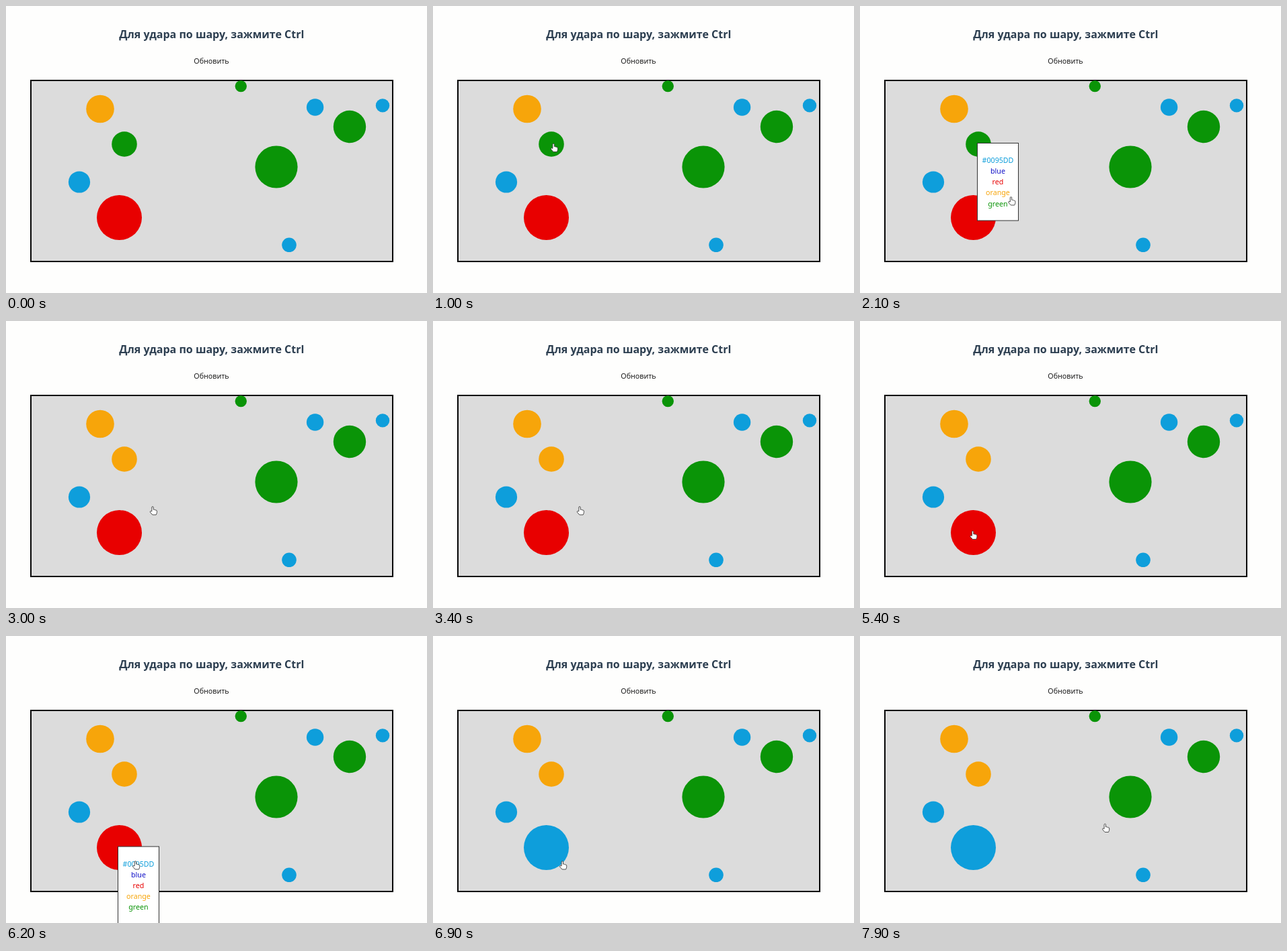
Write an HTML page that moves like this. It is 626 px wide and 428 px high and loops after 8000 ms.

```html
<!DOCTYPE html>
<html lang="ru">
<head>
<meta charset="utf-8">
<style>
  html, body { margin: 0; width: 100%; height: 100%; overflow: hidden; background: #fefefd; }
  svg { display: block; }
  text { font: 10.67px "Noto Sans", "Open Sans", sans-serif; text-anchor: middle; fill: #1c1c1c; }
  .title { font-size: 16px; font-weight: 700; fill: #2c3e50; }
  .sky { fill: #0e9edb; }
  .blue { fill: #1414c8; }
  .red { fill: #e80000; }
  .orange { fill: #f7a50a; }
  .green { fill: #0a9407; }
</style>
</head>
<body>
<svg width="626" height="428" viewBox="0 0 626 428">
  <text class="title" x="305.8" y="48">Для удара по шару, зажмите Ctrl</text>
  <text x="305.5" y="85.5">Обновить</text>
  <rect x="37" y="111" width="538" height="270" fill="#dcdcdc" stroke="#050505" stroke-width="2"/>

  <circle class="orange" cx="140" cy="153.5" r="20.8"/>
  <circle id="middle" cx="176" cy="206" r="18.8"/>
  <circle id="large" cx="168.5" cy="315.5" r="33.5"/>
  <g class="sky">
    <circle cx="109" cy="262.5" r="16.1"/>
    <circle cx="459.6" cy="151" r="12.7"/>
    <circle cx="560" cy="148.4" r="10.2"/>
    <circle cx="421" cy="356.3" r="10.8"/>
  </g>
  <g class="green">
    <circle cx="349.3" cy="119.6" r="8.7"/>
    <circle cx="511" cy="180" r="24.2"/>
    <circle cx="402" cy="240" r="31.6"/>
  </g>

  <g id="menu">
    <rect x=".5" width="61" height="115.5" fill="#fff" stroke="#333"/>
    <text class="sky" x="31" y="29.6">#0095DD</text>
    <text class="blue" x="31" y="45.7">blue</text>
    <text class="red" x="31" y="61.8">red</text>
    <text class="orange" x="31" y="77.9">orange</text>
    <text class="green" x="31" y="94">green</text>
  </g>
  <path id="hand" fill="#fff" stroke="#3c3c3c" stroke-width=".9" stroke-linejoin="round"
    d="M-1.2 7V1Q-1.2-.3 0-.3T1.2 1V4.2Q2.6 3.7 3 4.7Q4.4 4.2 4.8 5.2Q6.4 5 6.4 6.4V8.6Q6.2 10 5.2 12H-.2L-3.6 8.2Q-4 6.4-2.6 6.4Z"/>
</svg>
<script>
const LOOP = 8000, STEP = 100, MOVE = 450;

// The hand enters at START and eases to each stop, arriving at the given time.
const START = { x: 430, y: 215 };
const STOPS = [
  { at: 950, x: 179.3, y: 205.5 },
  { at: 1400, x: 174, y: 204.5 },
  { at: 2100, x: 224.5, y: 285 },
  { at: 2600, x: 218, y: 277 },
  { at: 4050, x: 370, y: 262 },
  { at: 4500, x: 178.3, y: 309.5 },
  { at: 5500, x: 166, y: 314 },
  { at: 6200, x: 192.3, y: 336 },
  { at: 7900, x: 364.3, y: 280.5 }
];

// Each ball gets a new color from a menu opened under the hand.
const RECOLORS = [
  { ball: 'middle', before: 'green', after: 'orange', open: 1400, choose: 2800 },
  { ball: 'large', before: 'red', after: 'sky', open: 5500, choose: 6500 }
];

const byId = id => document.getElementById(id);
const clamp = u => Math.min(1, Math.max(0, u));
const ease = u => u * u * (3 - 2 * u);

function handAt(t) {
  return STOPS.reduce((pos, stop) => {
    const k = ease(clamp((t - stop.at) / MOVE + 1));
    return { x: pos.x + (stop.x - pos.x) * k, y: pos.y + (stop.y - pos.y) * k };
  }, START);
}

function place(id, point) {
  const node = byId(id);
  node.style.display = point ? '' : 'none';
  if (point) node.setAttribute('transform', `translate(${point.x} ${point.y})`);
}

function draw(now) {
  const t = Math.floor(now % LOOP / STEP) * STEP;
  for (const { ball, before, after, choose } of RECOLORS)
    byId(ball).setAttribute('class', t < choose ? before : after);
  const active = RECOLORS.find(r => t >= r.open && t < r.choose);
  place('menu', active && handAt(active.open));
  place('hand', t >= STOPS[0].at - MOVE && handAt(t));
}

function tick() {
  draw(performance.now());
  requestAnimationFrame(tick);
}
tick();
</script>
</body>
</html>
```
